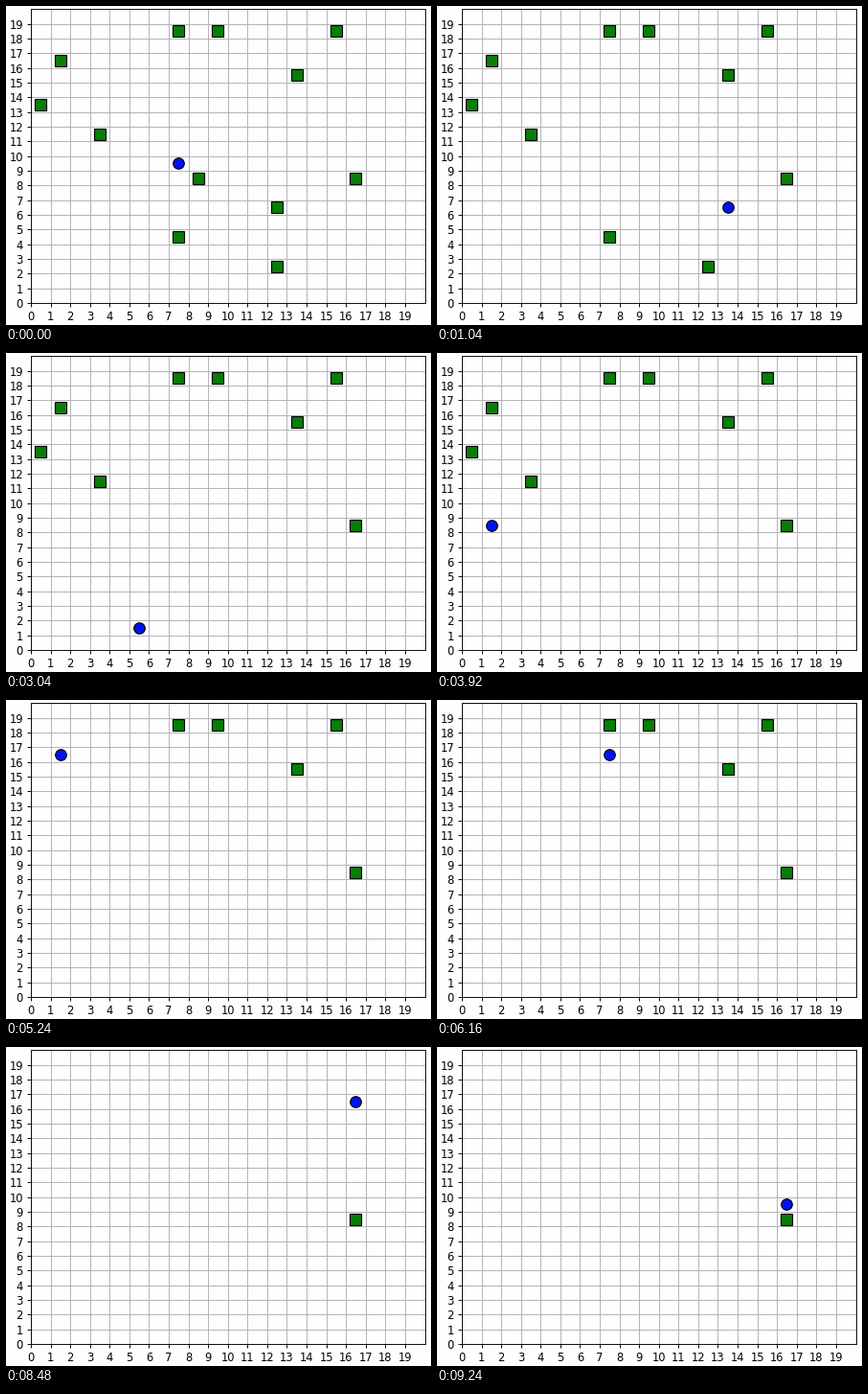
A matplotlib script for the animation above (9280 ms loop, 444x333 px).

```python
import random

import matplotlib.pyplot as plt
from matplotlib.animation import FuncAnimation

FRAMES, STEP_MS = 232, 40
W, H, DPI = 444, 333, 100
K = 0.83  # size of default matplotlib points on this stage

FOOD = [(7, 18), (9, 18), (15, 18), (13, 15), (1, 16), (0, 13),
        (3, 11), (8, 8), (16, 8), (12, 6), (7, 4), (12, 2)]
START = (7, 9)

# last frame, goal x, goal y, number of moves
LEGS = [
    (6, 8, 8, 6), (24, 12, 6, 10), (38, 12, 2, 10), (47, 10, 1, 9),
    (53, 8, 3, 4), (58, 7, 4, 4), (72, 4, 1, 10), (98, 1, 8, 20),
    (107, 3, 11, 9), (121, 0, 13, 9), (122, 0, 14, 1), (131, 1, 16, 7),
    (146, 5, 17, 15), (156, 7, 18, 9), (164, 9, 18, 8), (171, 9, 17, 7),
    (178, 12, 15, 7), (180, 13, 15, 1), (191, 15, 18, 9), (195, 16, 17, 4),
    (212, 16, 16, 13), (219, 18, 13, 7), (231, 16, 9, 10),
]


def distance(a, b):
    return abs(a[0] - b[0]) + abs(a[1] - b[1])


def bounds(a, b, margin):
    return max(min(a, b) - margin, 0), min(max(a, b) + margin, 18)


def wander(pos, goal, moves, blocked, rng):
    """Random walk near the two ends that reaches the goal on its last move."""
    margin = 1 if moves > distance(pos, goal) + 2 else 0
    x0, x1 = bounds(pos[0], goal[0], margin)
    y0, y1 = bounds(pos[1], goal[1], margin)
    path = []
    for left in reversed(range(moves)):
        x, y = pos
        near = (x + 1, y), (x - 1, y), (x, y + 1), (x, y - 1)
        pos = rng.choice([p for p in near
                          if x0 <= p[0] <= x1 and max(y0, 1) <= p[1] <= y1
                          and distance(p, goal) <= left and p not in blocked])
        path.append(pos)
    return path


def build_track():
    rng = random.Random(7)
    track, pos, begin = [START], START, 0
    for end, x, y, moves in LEGS:
        goal = x, y
        blocked = set(FOOD) - set(track) - {goal}
        path = [pos] + wander(pos, goal, moves, blocked, rng)
        span = end - begin
        track += [path[f * moves // span] for f in range(1, span + 1)]
        pos, begin = goal, end
    return track


track = build_track()
eaten_at = [track.index(p) if p in track else FRAMES for p in FOOD]

fig = plt.figure(figsize=(W / DPI, H / DPI), dpi=DPI, facecolor="#fefdff")
ax = fig.add_axes([26 / W, 23 / H, 411.5 / W, 306.7 / H], facecolor="#fefdff")
ax.set(xlim=(0, 20), ylim=(0, 20), xticks=range(20), yticks=range(20))
ax.tick_params(labelsize=10 * K, length=3.5 * K, width=0.8 * K, pad=3.5 * K)
ax.grid(color="#b0b0b0", linewidth=0.8 * K)
for spine in ax.spines.values():
    spine.set_linewidth(0.8 * K)

marker = dict(linestyle="none", markersize=10 * K, markeredgecolor="black",
              markeredgewidth=K)
food, = ax.plot([], [], "s", markerfacecolor="#067f06", zorder=3, **marker)
agent, = ax.plot([], [], "o", markerfacecolor="#0012f5", zorder=4, **marker)


def update(i):
    rest = [p for p, t in zip(FOOD, eaten_at) if t > i]
    food.set_data([x + 0.5 for x, _ in rest], [y + 0.5 for _, y in rest])
    x, y = track[i]
    agent.set_data([x + 0.5], [y + 0.5])
    return food, agent


anim = FuncAnimation(fig, update, frames=FRAMES, interval=STEP_MS,
                     init_func=lambda: update(0), repeat=True, repeat_delay=0)
plt.show()
```
